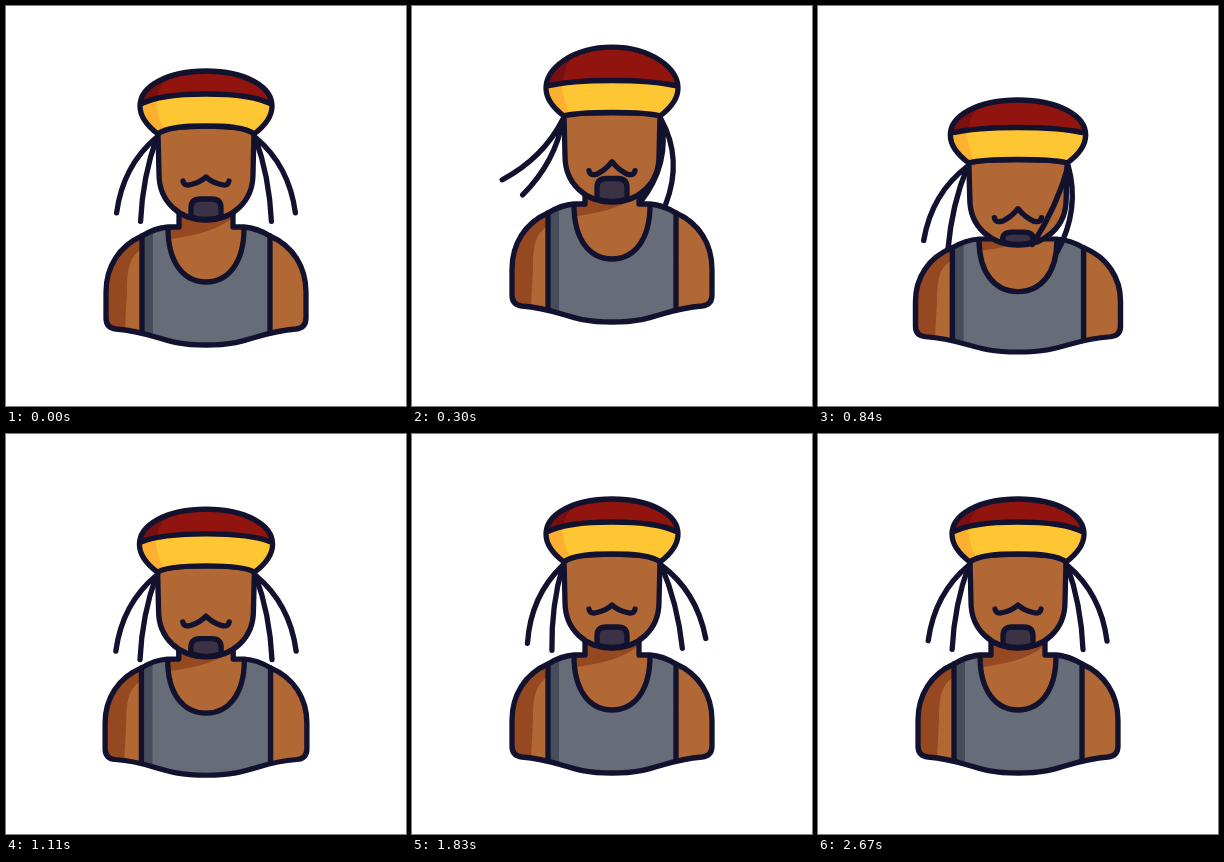
Write an HTML page that moves like this. It is 400 px wide and 400 px high and loops after 4700 ms.

```html
<!DOCTYPE html>
<html lang="en">
<head>
<meta charset="utf-8">
<title>Jumping man in a knitted cap</title>
<style>
  html, body { margin: 0; width: 100%; height: 100%; overflow: hidden; background: #fff; }
  svg { display: block; width: 100%; height: 100%; }
  .line { fill: none; stroke: #12122f; stroke-width: 5.3; stroke-linecap: round; stroke-linejoin: round; }
  .skin { fill: #b16835; }
  .shade { fill: #964821; }
</style>
</head>
<body>
<svg viewBox="0 0 400 400">
  <g id="figure">
    <g id="body">
      <path class="skin" d="M173 185V221H162Q149 222 136 230C113 240 100 261 100 286V312Q100 322 110 323C150 326 155 339 200 339C245 339 250 326 290 323Q300 322 300 312V286C300 261 287 240 264 230Q251 222 238 221H227V185Z"/>
      <path class="shade" d="M136 243C124 250 121 262 121 285L119 324L110 323Q100 322 100 312V286C100 261 113 240 136 230Z"/>
      <path class="shade" d="M173 185H227V211Q210 227 165 233L162 221H173Z"/>
      <path fill="#666d78" d="M136 230Q149 222 162 221C162 257 178 276 200 276C222 276 238 257 238 221Q251 222 264 230V327C240 333 230 339 200 339C170 339 160 333 136 327Z"/>
      <path fill="#464d5a" d="M136 230L147 225V330L136 327Z"/>
      <path class="line" d="M136 230V326M264 230V326M162 222C162 257 178 276 200 276C222 276 238 257 238 222"/>
      <path class="line" d="M173 185V221H162Q149 222 136 230C113 240 100 261 100 286V312Q100 322 110 323C150 326 155 339 200 339C245 339 250 326 290 323Q300 322 300 312V286C300 261 287 240 264 230Q251 222 238 221H227V185"/>
    </g>
    <path id="face" class="line" style="fill:#b16835"/>
    <path id="beard" class="line" style="fill:#3b3345"/>
    <path id="moustache" class="line"/>
    <path id="hair" class="line"/>
    <path id="cap" fill="#92140f"/>
    <path id="capShade" fill="#7a0f12"/>
    <path id="band" fill="#ffc634"/>
    <path id="bandShade" fill="#fdb02f"/>
    <path id="capLine" class="line"/>
  </g>
</svg>
<script>
const LOOP = 4700, STEP = 30, END = 2670;
const $ = id => document.getElementById(id);
const draw = (id, d) => $(id).setAttribute('d', d);

// time, head shift, body shift, extra tilt of the head
const JUMP = [
  [0, 0, 0, 0],
  [130, 29, 7, 4.5],
  [300, -18, -23, 4.5],
  [440, -38, -36, -5],
  [540, -34, -28, -9],
  [840, 29, 7, 4.5],
  [1250, -2.5, -2, -.6],
  [1470, 0, 0, 0]
];

// time, swing of the left and right hair in degrees
const SWING = [
  [0, 0, 0],
  [300, -17, -25],
  [540, 10, 10],
  [840, -2, -35],
  [960, -30, -28]
];

// Smooth curve through all rows; flat at both ends
function sample(rows, t) {
  const last = rows.length - 1;
  if (t >= rows[last][0]) return rows[last].slice(1);
  const i = rows.findIndex(r => r[0] > t) - 1;
  const a = rows[i], b = rows[i + 1], span = b[0] - a[0], u = (t - a[0]) / span;
  const slope = (k, c) => k <= 0 || k >= last ? 0
    : (rows[k + 1][c] - rows[k - 1][c]) / (rows[k + 1][0] - rows[k - 1][0]);
  const ease = u * u * (3 - 2 * u);
  return a.slice(1).map((v, j) => {
    const c = j + 1;
    return v + (b[c] - v) * ease
      + span * u * (1 - u) * ((1 - u) * slope(i, c) - u * slope(i + 1, c));
  });
}

// After the last key the hair rings out like a pendulum
function ring(t) {
  const u = Math.max(0, t - SWING[SWING.length - 1][0]);
  return Math.exp(-u / 420) * Math.cos(2 * Math.PI * u / 600);
}

function strand(x, y, deg, bend) {
  const r = deg * Math.PI / 180, s = Math.sin(r), c = Math.cos(r), len = 86;
  const mx = x + s * len * .48 + c * bend * 2;
  const my = y + c * len * .48 - s * bend * 2;
  return `M${x} ${y}Q${mx} ${my} ${x + s * len} ${y + c * len}`;
}

function drawBody(shift, squash) {
  const tall = 1 - squash * 5 / 118;
  const neck = 221 + shift + 5 * squash;
  $('body').setAttribute('transform', `translate(0 ${neck - 221 * tall}) scale(1 ${tall})`);
}

function drawFace(head, tilt, squash, be, bm) {
  const chin = 214 + head - 4 * squash;
  const beard = 193 + head * 1.14;
  draw('face', `M152 ${be}L153 ${chin - 46}C153 ${chin - 18} 174 ${chin} 200 ${chin}
    C226 ${chin} 247 ${chin - 18} 247 ${chin - 46}L248 ${be}
    C240 ${bm + 1} 220 ${bm} 200 ${bm}C180 ${bm} 160 ${bm + 1} 152 ${be}Z`);

  const r = Math.min(9, (chin - beard) * .6);
  draw('beard', `M185 ${chin - 3}V${beard + r}Q185 ${beard} 194 ${beard}H206
    Q215 ${beard} 215 ${beard + r}V${chin - 3}Q200 ${chin + 2} 185 ${chin - 3}Z`);

  const tip = 175 + head + 1.7 * tilt, mid = tip - 4 - 1.1 * tilt;
  const low = tip + 3.5, bow = (tip + mid) / 2 + 3.5;
  draw('moustache', `M177 ${tip}C178 ${low + 1} 181 ${low + 1} 185 ${low}Q194 ${bow} 200 ${mid}
    Q206 ${bow} 215 ${low}C219 ${low + 1} 222 ${low + 1} 223 ${tip}`);
}

function drawHair(t, head, root) {
  const [left, right] = sample(SWING, t).map(v => v * ring(t));
  const air = Math.min(1, Math.max(0, -head / 18));
  draw('hair', [-28, -11, 11, 28].map((rest, i) => {
    const swing = i < 2 ? left : right, bend = rest * .3;
    return strand(i < 2 ? 151 : 249, root, rest + swing, bend - air * (bend + .4 * swing));
  }).join(''));
}

function drawCap(top, se, sm, be, bm) {
  const side = se + 2;
  const edge = `C144 ${be - 5} 134 ${side + 12}`;
  const seam = `M135 ${se}C150 ${sm + 2} 175 ${sm} 200 ${sm}C225 ${sm} 250 ${sm + 2} 265 ${se}`;
  const outline = `M152 ${be + 1}C160 ${bm + 1} 180 ${bm} 200 ${bm}
    C220 ${bm} 240 ${bm + 1} 248 ${be + 1}C256 ${be - 5} 266 ${side + 12} 266 ${side}
    C266 ${side - 19} 240 ${top} 200 ${top}C160 ${top} 134 ${side - 19} 134 ${side}
    ${edge.replace('C144', `C134 ${side + 12} 144`).split(' 134 ' + (side + 12))[0]}`;
  const shell = `M152 ${be + 1}C160 ${bm + 1} 180 ${bm} 200 ${bm}
    C220 ${bm} 240 ${bm + 1} 248 ${be + 1}C256 ${be - 5} 266 ${side + 12} 266 ${side}
    C266 ${side - 19} 240 ${top} 200 ${top}C160 ${top} 134 ${side - 19} 134 ${side}
    C134 ${side + 12} 144 ${be - 5} 152 ${be + 1}Z`;
  draw('cap', shell);
  draw('capShade', `M135 ${se}C136 ${se - 14} 150 ${top + 7} 166 ${top + 4}
    Q153 ${top + 12} 151 ${sm + 5}Z`);
  draw('band', `${seam}C266 ${side + 12} 256 ${be - 5} 248 ${be + 1}
    C240 ${bm + 1} 220 ${bm} 200 ${bm}C180 ${bm} 160 ${bm + 1} 152 ${be + 1}${edge} 135 ${se}Z`);
  draw('bandShade', `M135 ${se}Q142 ${sm + 5} 150 ${sm + 3}Q150 ${be - 18} 158 ${bm + 3}
    L152 ${be + 1}${edge} 135 ${se}Z`);
  draw('capLine', shell + seam);
}

function render(t) {
  const [head, shift, tilt] = sample(JUMP, t);
  const squash = Math.max(0, head) / 29, lift = Math.min(0, head);
  const wide = 1 + .025 * squash;
  $('figure').setAttribute('transform', `translate(${200 - 200 * wide} 0) scale(${wide} 1)`);

  const top = 65 + head + .33 * lift;
  const se = 98 + head, sm = 88 + head + tilt;
  const be = 127 + head, bm = 120 + head + tilt;
  drawBody(shift, squash);
  drawFace(head, tilt, squash, be, bm);
  drawHair(t, head, be + 4);
  drawCap(top, se, sm, be, bm);
}

const start = performance.now();
function tick() {
  const t = (performance.now() - start) % LOOP;
  render(Math.min(END, Math.floor(t / STEP) * STEP));
  requestAnimationFrame(tick);
}
tick();
</script>
</body>
</html>
```
